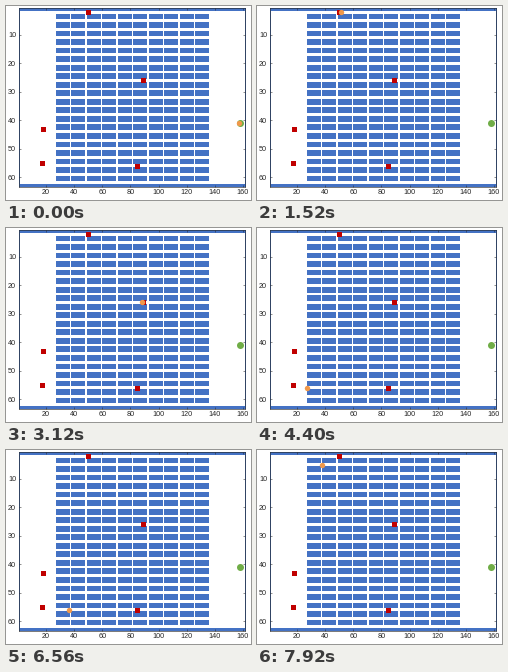
A matplotlib script that plays this animation: 245 by 194 pixels, repeating every 8 s.

```python
import numpy as np
import matplotlib.pyplot as plt
from matplotlib.animation import FuncAnimation
from matplotlib.colors import ListedColormap

W, H, DPI = 245, 194, 72
COLS, ROWS = 161, 63
FRAMES, INTERVAL, CELLS_PER_FRAME = 100, 80, 10
BLUE, RED, GREEN, ORANGE = "#4472c4", "#c00000", "#70ad47", "#f0984a"

STOPS = [(50, 2), (89, 26), (18, 43), (17, 55), (85, 56)]
DEPOT = (158, 41)


def warehouse():
    """Blocks of 2 x 10 cells separated by one-cell aisles, inside a wall."""
    grid = np.zeros((ROWS, COLS))
    grid[[0, -1], :] = 1
    grid[:, [0, -1]] = 1
    for row in range(2, 61, 3):
        for col in range(26, 136, 11):
            grid[row:row + 2, col:col + 10] = 1
    return grid


def expand(corners):
    """One entry per cell along the route; a repeated corner is a short wait."""
    cells = [corners[0]]
    for (c0, r0), (c1, r1) in zip(corners, corners[1:]):
        n = max(abs(c1 - c0) + abs(r1 - r0), 1)
        cells += [(c0 + (c1 - c0) * k / n, r0 + (r1 - r0) * k / n)
                  for k in range(1, n + 1)]
    return cells


def pick_up(gap):
    """From the lower stop to the top one, climbing through the given gap."""
    return [(92, 56), (92, 26), (89, 26), (89, 26), (gap, 26), (gap, 2),
            (50, 2), (50, 2)]


WEST = [(18, 2), (18, 43), (18, 55), (17, 55), (17, 56)]
LOWER = [(85, 56), (85, 56)]

route = expand(
    [(157, 41), (137, 41), (137, 56), (85, 56)] + pick_up(81)
    + [(24, 2), (24, 43), (18, 43), (18, 55), (17, 55), (17, 56)]
    + LOWER + pick_up(59) + WEST
    + LOWER + pick_up(81) + WEST
    + LOWER + pick_up(81) + [(48, 2), (48, 5), (26, 5)])

plt.rcParams["font.family"] = "Liberation Sans"
fig = plt.figure(figsize=(W / DPI, H / DPI), dpi=DPI, facecolor="white")
left, right, top, bottom = 12.6, 239.1, 2, 181
ax = fig.add_axes([left / W, 1 - bottom / H,
                   (right - left) / W, (bottom - top) / H])
ax.imshow(warehouse(), cmap=ListedColormap(["white", BLUE]), aspect="auto",
          interpolation="nearest", extent=(0.5, COLS + 0.5, ROWS + 0.5, 0.5))
ax.set_xticks(range(20, 161, 20))
ax.set_yticks(range(10, 61, 10))
ax.tick_params(direction="in", length=2, width=0.5, pad=2.5, labelsize=7.3,
               color="#262626", labelcolor="#262626", top=True, right=True)
for spine in ax.spines.values():
    spine.set(linewidth=0.6, color="#262626")


def marker(cell, shape, size, color, z):
    return ax.plot(*cell, shape, ms=size, color=color, mew=0,
                   zorder=z, clip_on=False)[0]


for stop in STOPS:
    marker(stop, "s", 5, RED, 3)
marker(DEPOT, "o", 7, GREEN, 3)
robot = marker(route[0], "o", 5.4, ORANGE, 4)


def update(frame):
    col, row = route[frame * CELLS_PER_FRAME]
    robot.set_data([col], [row])
    return robot,


anim = FuncAnimation(fig, update, frames=FRAMES, interval=INTERVAL,
                     repeat=True, repeat_delay=0)
plt.show()
```
